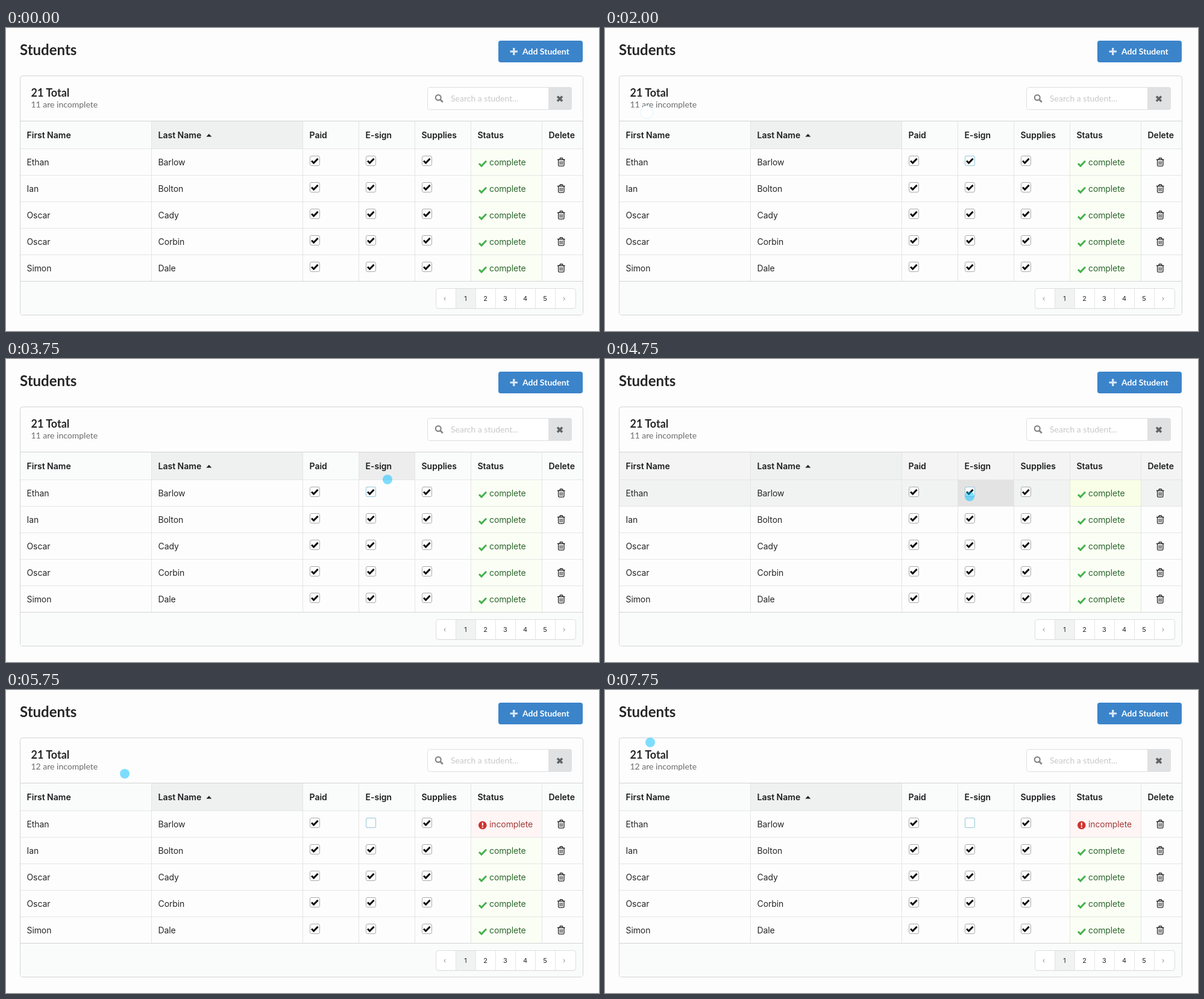
An HTML page for the animation above (8000 ms loop, 984 by 503 pixels).

```html
<!DOCTYPE html>
<html lang="en">
<head>
<meta charset="utf-8">
<title>Students</title>
<style>
html, body { margin: 0; width: 100%; height: 100%; overflow: hidden; background: #fdfdfd; }
svg { display: block; width: 984px; height: 503px; }
text { font: 14px Inter, sans-serif; fill: #262627; letter-spacing: -.1px; }
.lato { font-family: Lato, sans-serif; letter-spacing: 0; }
.bold { font-weight: 700; }
.head { font-weight: 600; fill: #1b1c1d; letter-spacing: 0; }
.page { font-size: 11px; text-anchor: middle; letter-spacing: 0; }
.line { stroke: #e4e5e5; }
.edge { stroke: #d4d4d5; }

.step { animation: 8s step-end infinite; }
#dot { animation-name: move; fill: #00beff80; }
#ring { animation-name: ring; fill: #fff; stroke: #dff2f8; }
#pulse { animation-name: pulse; fill: #00beff; }
#hoverHead { animation-name: hover-head; }
#hoverRow { animation-name: hover-row; }
#focus { animation-name: focus; }
.before { animation-name: before; }
.after { animation-name: after; }

@keyframes move {
  0% { opacity: 0; transform: translate(677px, 109px); }
  6.25% { opacity: 1; transform: translate(677px, 109px); }
  9.375% { transform: translate(550px, 145px); opacity: 1; }
  12.5% { transform: translate(297px, 153px); opacity: 1; }
  18.75% { transform: translate(160px, 147px); opacity: 1; }
  21.875% { transform: translate(69px, 140px); opacity: 1; }
  25% { transform: translate(69px, 140px); opacity: 0; }
  28.125% { transform: translate(60px, 138px); opacity: 1; }
  31.25% { transform: translate(52px, 133px); opacity: 1; }
  34.375% { transform: translate(70px, 130px); opacity: 1; }
  37.5% { transform: translate(230px, 120px); opacity: 1; }
  40.625% { transform: translate(500px, 126px); opacity: 1; }
  43.75% { transform: translate(567px, 97px); opacity: 1; }
  46.875% { transform: translate(633px, 200px); opacity: 1; }
  50% { transform: translate(615px, 220px); opacity: 1; }
  53.125% { transform: translate(607px, 226px); opacity: 1; }
  56.25% { transform: translate(605px, 228px); opacity: 1; }
  68.75% { transform: translate(420px, 180px); opacity: 1; }
  71.875% { transform: translate(197px, 139px); opacity: 1; }
  75% { transform: translate(63px, 141px); opacity: 1; }
  78.125% { transform: translate(55px, 132px); opacity: 1; }
  81.25% { transform: translate(48px, 118px); opacity: 1; }
  84.375% { transform: translate(46px, 109px); opacity: 1; }
  87.5% { transform: translate(46px, 105px); opacity: 1; }
  93.75% { transform: translate(110px, 73px); opacity: 1; }
  96.875%, 100% { transform: translate(75px, 87px); opacity: 1; }
}
@keyframes ring { 0%, 28.125%, 100% { opacity: 0; } 25% { opacity: 1; } }
@keyframes pulse { 0%, 65.625%, 100% { opacity: 0; } 62.5% { opacity: .15; } }
@keyframes hover-head { 0%, 50%, 100% { opacity: 0; } 46.875% { opacity: 1; } }
@keyframes hover-row { 0%, 68.75%, 100% { opacity: 0; } 50% { opacity: 1; } }
@keyframes focus { 0%, 100% { opacity: 0; } 25% { opacity: 1; } }
@keyframes before { 0% { opacity: 1; } 65.625%, 100% { opacity: 0; } }
@keyframes after { 0% { opacity: 0; } 65.625%, 100% { opacity: 1; } }
</style>
</head>
<body>
<svg id="stage" viewBox="0 0 984 503">
  <defs>
    <path id="tick" d="M507 220.5l3.6 3.6l7-7.2" fill="none" stroke="#111" stroke-width="3"/>
    <rect id="box" x="504.5" y="212.5" width="16" height="16" rx="2.5" fill="#fff"/>
    <path id="done" d="M785 225l4 4l8-8.2" fill="none" stroke="#43b04a" stroke-width="3"/>
    <g id="bin" fill="none" stroke="#262627" stroke-width="1.3">
      <path d="M915 218.5h12.5M918.6 218l1-2h3.6l1 2M916.6 219v8.6q0 1.6 1.6 1.6h6.2q1.6 0 1.6-1.6v-8.6"/>
      <path d="M919.2 221v6M921.3 221v6M923.4 221v6" stroke-width="1"/>
    </g>
  </defs>

  <text class="lato bold" x="23" y="45" style="font-size:24px">Students</text>
  <rect x="817" y="21" width="140" height="36" rx="4" fill="#3b84ca"/>
  <path d="M836.5 39h12.5M842.75 33v12" stroke="#dce9f5" stroke-width="3.2"/>
  <text class="lato bold" x="857" y="44" style="fill:#fff">Add Student</text>

  <rect class="edge" x="23.5" y="79.5" width="934" height="397" rx="4" fill="#fdfdfd"/>
  <text class="lato bold" x="41.5" y="114" style="font-size:18px">21 Total</text>
  <g class="lato" id="counts"></g>

  <rect x="699.5" y="98.5" width="239" height="37" rx="4" fill="#fff" stroke="#dededf"/>
  <path d="M900 98h35a4 4 0 0 1 4 4v30a4 4 0 0 1-4 4h-35z" fill="#e0e1e2"/>
  <circle cx="717.3" cy="115.5" r="4.4" fill="none" stroke="#868686" stroke-width="2.2"/>
  <path d="M720.5 118.7l4.3 4.3" stroke="#868686" stroke-width="2.8"/>
  <text class="lato" x="738" y="122" style="fill:#c8c8c9">Search a student...</text>
  <path d="M915 113.500l8 8M923 113.500l-8 8" stroke="#616263" stroke-width="3.6"/>

  <g id="table"></g>
  <g id="pager"></g>

  <circle class="step" id="ring" cx="69" cy="140" r="10.5"/>
  <circle class="step" id="pulse" cx="605" cy="228" r="22"/>
  <circle class="step" id="dot" r="8"/>
</svg>
<script>
const people = [['Ethan', 'Barlow'], ['Ian', 'Bolton'], ['Oscar', 'Cady'], ['Oscar', 'Corbin'], ['Simon', 'Dale']];
const heads = ['First Name', 'Last Name', 'Paid', 'E-sign', 'Supplies', 'Status', 'Delete'];
const cols = [24, 241, 492, 585, 678, 771, 889, 957];
const top0 = 201, rowH = 44;

const rect = (x, y, w, h, fill, more = '') => `<rect x="${x}" y="${y}" width="${w}" height="${h}" fill="${fill}" ${more}/>`;
const text = (x, y, s, more = '') => `<text x="${x}" y="${y}" ${more}>${s}</text>`;
const use = (id, x, y, more = '') => `<use href="#${id}" x="${x}" y="${y}" ${more}/>`;
const line = (d, cls = 'line') => `<path class="${cls}" d="${d}"/>`;
const fill = (id, html) => document.getElementById(id).innerHTML = html;

function table() {
  let s = rect(24, 155, 933, 45, '#fafbfb') + rect(242, 155, 250, 45, '#eff0f0')
    + rect(24, 421, 933, 55, '#fafbfb', 'rx="3"')
    + rect(772, top0, 117, 5 * rowH, '#fbfef5')
    + `<g class="step after">${rect(772, top0, 117, rowH, '#fff5f5')}</g>`
    + `<g class="step" id="hoverHead">${rect(586, 155, 92, 45, '#ededee')}</g>`
    + `<g class="step" id="hoverRow">${rect(24, 155, 933, 45, '#f4f4f4') + rect(242, 155, 250, 45, '#eff0f0')
      + rect(24, top0, 933, 43, '#f1f2f2') + rect(586, top0, 92, 43, '#e3e3e3')
      + `<g class="step before">${rect(772, top0, 117, 43, '#f8ffe6')}</g>`
      + `<g class="step after">${rect(772, top0, 117, 43, '#ffe9e9')}</g>`}</g>`;

  for (let i = 0; i < 5; i++) s += line(`M24 ${200.5 + i * rowH}H957`);
  s += line(cols.slice(1, 7).map(x => `M${x + .5} 155V420`).join(''))
    + line('M24 154.500H957M24 420.500H957', 'edge');
  heads.forEach((h, i) => s += text(cols[i] + (i ? 11.500 : 10.500), 183, h, 'class="head"'));
  s += '<path d="M332.300 180.500l4.500-4.700l4.500 4.700z" fill="#222"/>';

  people.forEach(([first, last], r) => {
    const y = r * rowH, base = 228 + y;
    s += text(34.5, base, first) + text(252.5, base, last) + use('bin', 0, y);
    for (let c = 0; c < 3; c++) {
      const toggled = !r && c === 1;
      s += use('box', c * 93, y, 'stroke="#a9aaab"');
      if (toggled) s += `<g class="step" id="focus">${use('box', 93, 0, 'stroke="#96c8da"')}</g>`;
      s += use('tick', c * 93, y, toggled ? 'class="step before"' : '');
    }
    const ok = use('done', 0, y) + text(802, base, 'complete', 'style="fill:#2c662d"');
    s += r ? ok : `<g class="step before">${ok}</g><g class="step after">
      <circle cx="790.800" cy="224.500" r="6.800" fill="#cf3330"/>
      <path d="M790.800 220.300v5M790.800 226.700v2" stroke="#fff" stroke-width="2"/>
      ${text(802, base, 'incomplete', 'style="fill:#9f3a38"')}</g>`;
  });
  return s;
}

function pager() {
  let s = rect(713.5, 433.5, 232, 33, '#0000000d', 'rx="4"')
    + rect(713.5, 432.5, 232, 33, '#fff', 'rx="4" stroke="#dcddde"')
    + rect(747, 433, 32, 32, '#f1f2f2');
  ['‹', 1, 2, 3, 4, 5, '›'].forEach((p, i) => {
    const x = 713.5 + i * 33;
    if (i) s += line(`M${x} 433V465`);
    s += text(x + (i ? 16 : 14.5) - (i === 6 ? 1.5 : 0), 453, p, `class="page" ${i % 6 ? '' : 'style="fill:#888"'}`);
  });
  return s;
}

fill('counts', [[11, 'before'], [12, 'after']].map(([n, cls]) =>
  text(41.5, 132, n + ' are incomplete', `class="lato step ${cls}" style="fill:#6b6c6d"`)).join(''));
fill('table', table());
fill('pager', pager());
</script>
</body>
</html>
```
